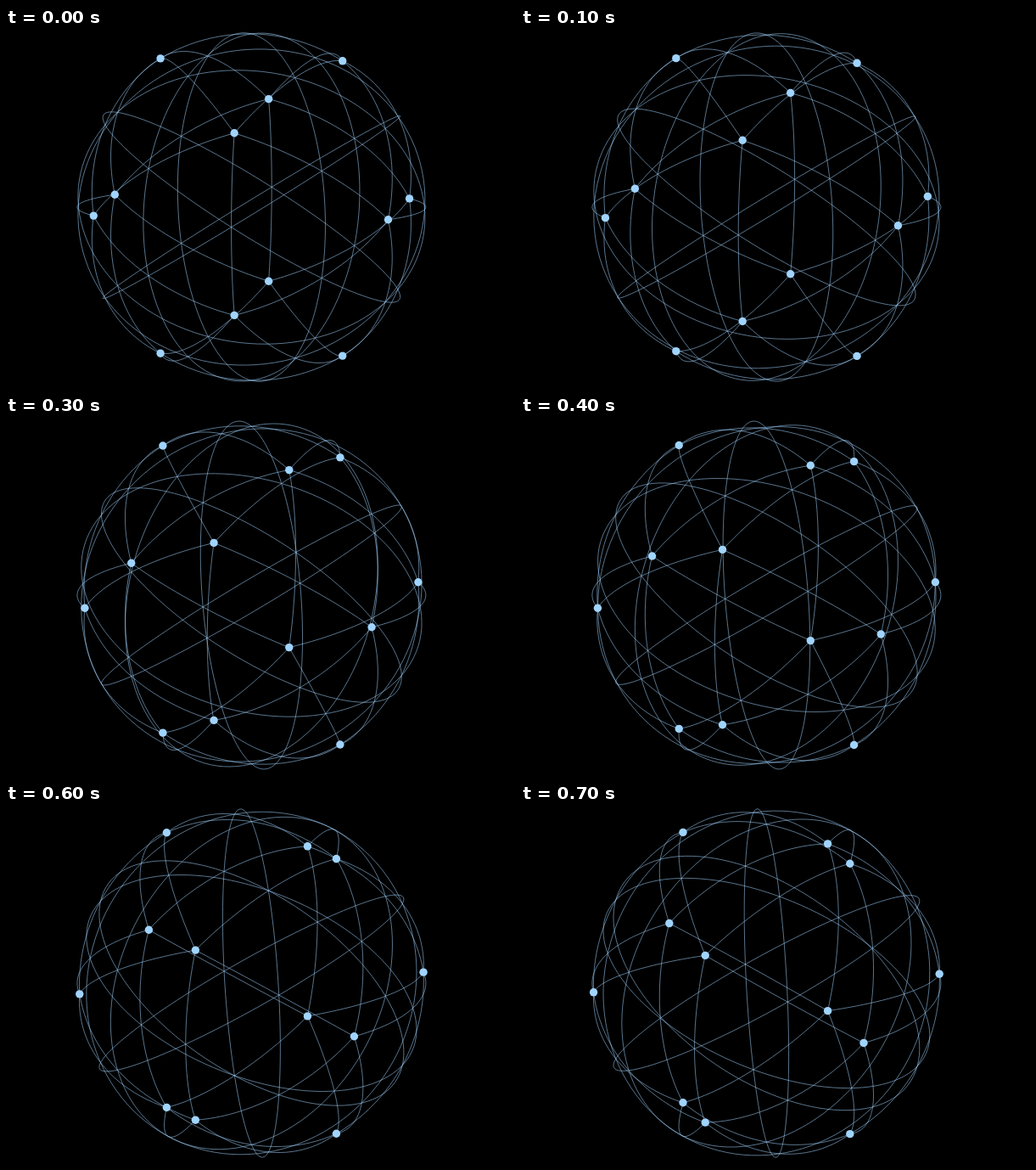
Write an HTML page that moves like this. It is 600 px wide and 424 px high and loops after 800 ms.

```html
<!DOCTYPE html>
<html lang="en">
<head>
<meta charset="utf-8">
<title>Rotating spherical icosahedron</title>
<style>
  html, body { margin: 0; width: 100%; height: 100%; overflow: hidden; background: #000; }
  svg { display: block; width: 100%; height: 100%; }
  path { fill: none; stroke: #a0d4ff; stroke-opacity: .55; stroke-width: 1; }
  circle { fill: #a0d4ff; }
</style>
</head>
<body>
<svg id="stage" viewBox="0 0 600 424"></svg>
<script>
const CX = 289.4, CY = 211, R = 205.5, DOT = 4.7;
const STEP = 100;
// Angle in degrees held during each step; the loop jumps back at the end.
const ANGLES = [6.65, 9.3, 12.14, 14.7, 17.27, 19.94, 22.2, 24.39];

const stage = document.getElementById('stage');
const add = (tag, attrs = {}) => {
  const el = document.createElementNS('http://www.w3.org/2000/svg', tag);
  for (const key in attrs) el.setAttribute(key, attrs[key]);
  return stage.appendChild(el);
};

const dot = (a, b) => a[0] * b[0] + a[1] * b[1] + a[2] * b[2];
const cross = (a, b) => [
  a[1] * b[2] - a[2] * b[1],
  a[2] * b[0] - a[0] * b[2],
  a[0] * b[1] - a[1] * b[0]
];
const unit = v => v.map(c => c / Math.hypot(...v));

// Points on the great circle from p towards the perpendicular q.
const sweep = (p, q, angle, count) =>
  Array.from({ length: count + 1 }, (_, i) => {
    const a = angle * i / count;
    return p.map((c, k) => c * Math.cos(a) + q[k] * Math.sin(a));
  });

// Icosahedron corners: cyclic shifts of (0, ±1, ±phi).
const PHI = (1 + Math.sqrt(5)) / 2;
const corners = [];
for (const s of [-1, 1]) for (const t of [-1, 1]) {
  corners.push([0, s, t * PHI], [s, t * PHI, 0], [t * PHI, 0, s]);
}
const verts = corners.map(unit);

const curves = [];
verts.forEach((a, i) => {
  verts.slice(i + 1).forEach(b => {
    const d = dot(a, b);
    if (d > 0) {
      const side = unit(b.map((c, k) => c - d * a[k]));
      curves.push(sweep(a, side, Math.acos(d), 24));
    } else if (d < -0.9) {
      // Equator perpendicular to each axis through opposite corners.
      const p = unit(cross(a, [0.3, 0.5, 0.8]));
      curves.push(sweep(p, cross(a, p), 2 * Math.PI, 120));
    }
  });
});

const lines = curves.map(() => add('path'));
const dots = verts.map(() => add('circle', { r: DOT }));

// Turn about the vertical axis, then tilt by the same angle.
function project([x, y, z], sin, cos) {
  const depth = z * cos - x * sin;
  return [
    (CX + R * (x * cos + z * sin)).toFixed(2),
    (CY + R * (y * cos - depth * sin)).toFixed(2)
  ];
}

function draw(step) {
  const a = ANGLES[step] * Math.PI / 180;
  const sin = Math.sin(a), cos = Math.cos(a);
  curves.forEach((points, i) => {
    lines[i].setAttribute('d', 'M' + points.map(p => project(p, sin, cos).join(' ')).join('L'));
  });
  verts.forEach((v, i) => {
    const [x, y] = project(v, sin, cos);
    dots[i].setAttribute('cx', x);
    dots[i].setAttribute('cy', y);
  });
}

const start = performance.now();
function tick() {
  const time = Math.max(0, performance.now() - start);
  draw(Math.floor(time / STEP) % ANGLES.length);
  requestAnimationFrame(tick);
}
tick();
</script>
</body>
</html>
```
